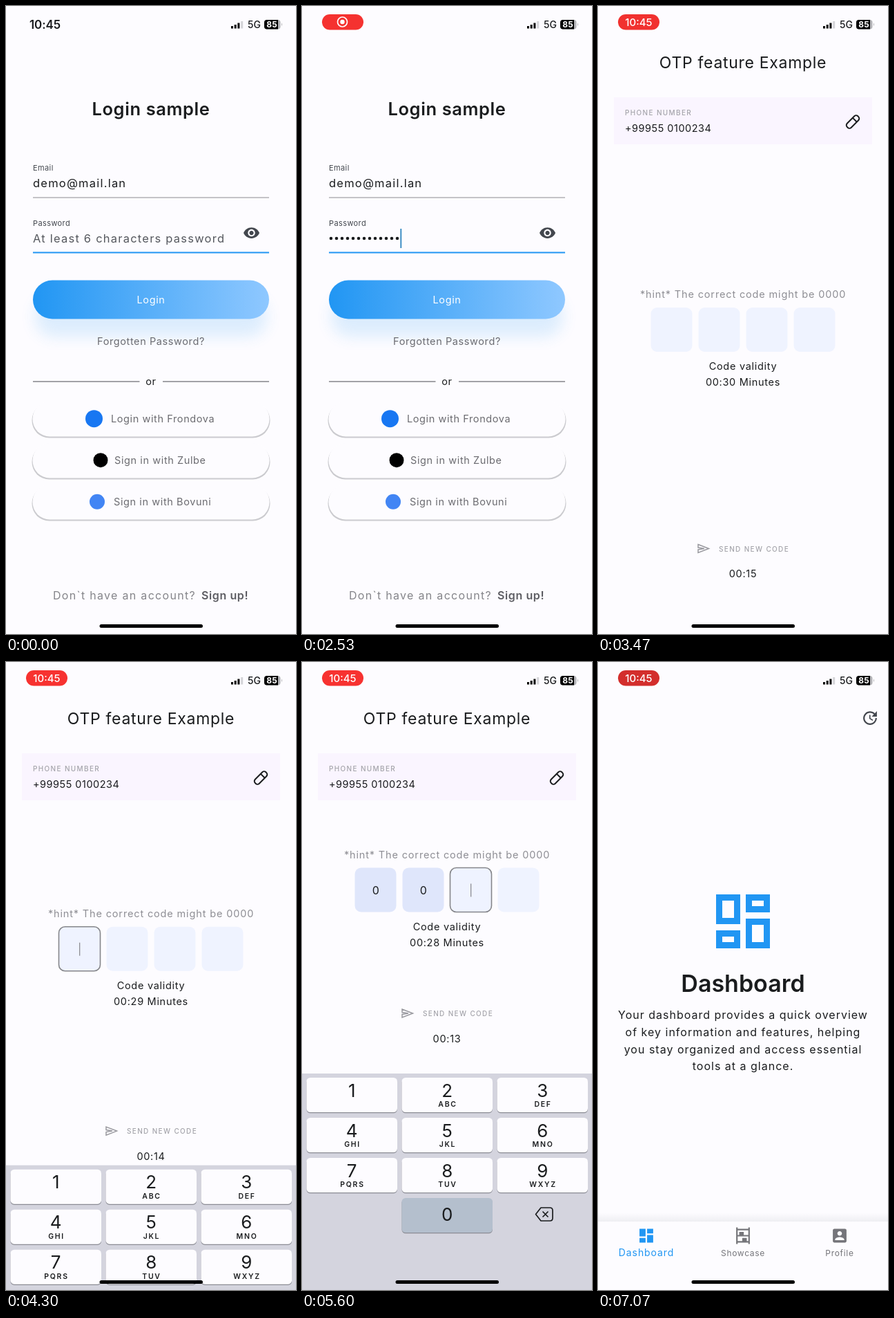
These frames come from a looping animation (420x908 px, 7130 ms). An HTML page:

```html
<!DOCTYPE html>
<html lang="en">
<head>
<meta charset="utf-8">
<title>Login flow</title>
<style>
html, body { margin: 0; width: 100%; height: 100%; overflow: hidden; background: #fdfcff; }
svg { display: block; width: 100vw; height: 100vh; }
text { font-family: Inter, "Work Sans", sans-serif; font-size: 14.5px; fill: #1a1c1e; letter-spacing: .7px; white-space: pre; }
.mid { text-anchor: middle; }
.small { font-size: 11px; letter-spacing: .4px; fill: #43474e; }
.field { font-size: 16.5px; letter-spacing: 1.22px; }
.link { letter-spacing: .6px; fill: #6b6b70; }
.caps { font-size: 10px; font-weight: 500; letter-spacing: 1.35px; fill: #a4a4aa; }
.para { font-size: 16px; letter-spacing: 1px; }
.tab { font-size: 12px; fill: #75757a; }
.digit { font-size: 26px; letter-spacing: 0; }
.letters { font-size: 10.5px; font-weight: 600; letter-spacing: 1.7px; }
.white { fill: #fff; }
.bg { fill: #fdfcff; }
</style>
</head>
<body>
<svg viewBox="0 0 420 908">
<defs>
  <linearGradient id="blue">
    <stop offset="0" stop-color="#2196f3"/>
    <stop offset="1" stop-color="#8fc8ff"/>
  </linearGradient>
  <linearGradient id="navShade" x2="0" y2="1">
    <stop offset="0" stop-color="#f0f0f4" stop-opacity="0"/>
    <stop offset="1" stop-color="#eeeef2"/>
  </linearGradient>
  <filter id="soft" x="-20%" y="-80%" width="140%" height="260%"><feGaussianBlur stdDeviation="11"/></filter>
</defs>

<g id="login">
  <rect class="bg" width="420" height="908"/>
  <text class="mid" x="210" y="158" style="font-size:25.5px;font-weight:600;letter-spacing:.6px">Login sample</text>
  <text class="small" x="39" y="237.5">Email</text>
  <text class="field" x="39" y="262">demo@mail.lan</text>
  <path d="M39 277H381" stroke="#8b8c90" stroke-width="1.2"/>
  <text class="small" x="39" y="317.5">Password</text>
  <text class="field" id="hint" x="39" y="342" style="fill:#55585e">At least 6 characters password</text>
  <path id="dots" stroke="#1a1c1e" stroke-width="4.6" stroke-linecap="round" stroke-dasharray="0 8"/>
  <rect id="caret" y="322" width="2" height="28" fill="#3f8fc5"/>
  <path d="M39 356.5H381" stroke="#2196f3" stroke-width="2"/>
  <path transform="translate(343 315.5) scale(1.045)" fill="#43474e" d="M12 4.5C7 4.5 2.73 7.61 1 12c1.73 4.39 6 7.5 11 7.5s9.27-3.11 11-7.5c-1.73-4.39-6-7.5-11-7.5zM12 17c-2.76 0-5-2.24-5-5s2.24-5 5-5 5 2.24 5 5-2.24 5-5 5zm0-8c-1.66 0-3 1.34-3 3s1.34 3 3 3 3-1.34 3-3-1.34-3-3-3z"/>
  <rect x="42" y="420" width="336" height="58" rx="28" fill="#2196f3" opacity=".15" filter="url(#soft)"/>
  <rect x="39" y="396.5" width="342" height="56" rx="28" fill="url(#blue)"/>
  <text class="mid link white" x="210" y="430">Login</text>
  <text class="mid link" x="210" y="490">Forgotten Password?</text>
  <path d="M39 543H193.500M227 543H381" stroke="#85858a" stroke-width="1.5"/>
  <text class="mid" x="210" y="548">or</text>
  <g id="social"></g>
  <text x="68" y="858" style="font-size:16px;letter-spacing:1.3px;fill:#85858a">Don`t have an account?</text>
  <text x="283" y="858" style="font-size:16px;letter-spacing:.6px;font-weight:600;fill:#5c5c62">Sign up!</text>
</g>

<g id="otp">
  <rect class="bg" width="420" height="908"/>
  <text class="mid" x="210" y="90" style="font-size:23px">OTP feature Example</text>
  <rect x="23" y="132" width="374" height="68" fill="#faf5ff"/>
  <text class="caps" x="39" y="158">PHONE NUMBER</text>
  <text x="39" y="182" style="letter-spacing:.5px">+99955 0100234</text>
  <g transform="translate(369 167.5) rotate(-45)" fill="none" stroke="#1a1c1e" stroke-width="2">
    <rect x="-11" y="-4.2" width="22" height="8.4" rx="3.6"/><path d="M4 -4V4"/>
  </g>
  <g id="code">
    <text class="mid" x="210" y="422" style="letter-spacing:.85px;fill:#8e8e94">*hint* The correct code might be 0000</text>
    <g id="cells"></g>
    <rect id="codeCaret" y="459" width="1.3" height="19" fill="#8e8e94"/>
    <text class="mid" x="210" y="526">Code validity</text>
    <text class="mid" x="210" y="549" id="validity"></text>
  </g>
  <g id="resend">
    <path d="M145 778.5L160.5 784.5L145 790.5V786L154 784.5L145 783Z" fill="none" stroke="#98989e" stroke-width="1.5"/>
    <text class="caps" x="175" y="788.5">SEND NEW CODE</text>
    <text class="mid" x="210" y="826" id="wait"></text>
  </g>
</g>

<g id="dash">
  <rect class="bg" width="420" height="908"/>
  <path transform="translate(380.8 67.8) scale(1.1)" fill="#43474e" d="M21 10.12h-6.78l2.74-2.82c-2.73-2.7-7.15-2.8-9.88-.1-2.73 2.71-2.73 7.08 0 9.79s7.15 2.71 9.88 0C18.32 15.65 19 14.08 19 12.1h2c0 1.98-.88 4.55-2.64 6.29-3.51 3.48-9.21 3.48-12.72 0-3.5-3.47-3.53-9.11-.02-12.58s9.14-3.47 12.65 0L21 3v7.12zM12.5 8v4.25l3.5 2.08-.72 1.21L11 13V8h1.5z"/>
  <path fill="none" stroke="#2196f3" stroke-width="9" d="M175.5 340.5h26v34h-26zM218.5 340.5h26v17h-26zM175.5 392.5h26v17h-26zM218.5 375.5h26v34h-26z"/>
  <text class="mid" x="210" y="477" style="font-size:34px;font-weight:600;letter-spacing:0">Dashboard</text>
  <text class="mid para" x="210" y="516">Your dashboard provides a quick overview</text>
  <text class="mid para" x="210" y="541">of key information and features, helping</text>
  <text class="mid para" x="210" y="566">you stay organized and access essential</text>
  <text class="mid para" x="210" y="590">tools at a glance.</text>
  <rect y="796" width="420" height="13" fill="url(#navShade)"/>
  <g fill="#75757a">
    <path transform="translate(56.8 816.3) scale(1.1)" fill="#2196f3" d="M3 13h8V3H3v10zm0 8h8v-6H3v6zm10 0h8V11h-8v10zm0-18v6h8V3h-8z"/>
    <path transform="translate(196.8 816.3) scale(1.1)" d="M19 23v-2H5v2H3V1h2v2h14V1h2v22zM5 11h2V7h6v4h6V5H5zm0 8h6v-4h6v4h2v-6H5z"/>
    <path transform="translate(336.8 816.3) scale(1.1)" d="M3 5v14c0 1.1.89 2 2 2h14c1.1 0 2-.9 2-2V5c0-1.1-.9-2-2-2H5c-1.11 0-2 .9-2 2zm12 4c0 1.66-1.34 3-3 3s-3-1.34-3-3 1.34-3 3-3 3 1.34 3 3zm-9 8c0-2 4-3.1 6-3.1s6 1.1 6 3.1v1H6v-1z"/>
  </g>
  <text class="mid" x="70" y="858.5" style="font-size:14px;letter-spacing:.9px;fill:#2196f3">Dashboard</text>
  <text class="mid tab" x="210" y="859">Showcase</text>
  <text class="mid tab" x="350" y="859">Profile</text>
</g>

<g id="keyboard">
  <rect y="595" width="420" height="320" fill="#d4d4de"/>
  <g id="keys"></g>
  <path d="M346 789h13q4 0 4 4v11q0 4-4 4h-13l-7.5-9.5zM348.5 794.5l8 8m0-8l-8 8" fill="none" stroke="#1a1c1e" stroke-width="1.7" stroke-linejoin="round"/>
</g>

<text id="clock" x="34" y="33" style="font-size:17px;font-weight:600;letter-spacing:-.1px">10:45</text>
<g id="pill">
  <rect id="pillBox" x="29" y="12" width="60" height="22.5" rx="11.25"/>
  <g id="rec">
    <circle cx="58.5" cy="23" r="7" fill="none" stroke="#fff" stroke-width="1.7"/>
    <circle cx="58.5" cy="23" r="3.2" fill="#fff"/>
  </g>
  <text id="pillTime" class="mid white" x="59" y="28.5" style="font-size:15px;font-weight:500;letter-spacing:0">10:45</text>
</g>
<path d="M326 29h3v3.500h-3zM330.700 27h3v5.500h-3zM335.400 24.500h3v8h-3z"/>
<path d="M340.200 22h3v10.500h-3z" fill="#d4d4d8"/>
<text x="350" y="32" style="font-size:14px;font-weight:500;letter-spacing:0">5G</text>
<rect x="374" y="20" width="23.5" height="13.5" rx="4" fill="#b4b4b8"/>
<path d="M378 20h16v13.500h-16q-4 0-4-4v-5.500q0-4 4-4z"/>
<path d="M399 24.500q2 2.200 0 4.500z" fill="#b4b4b8"/>
<text class="mid white" x="385" y="31.3" style="font-size:12px;font-weight:700;letter-spacing:0">85</text>
<rect x="135.5" y="894" width="149.5" height="5" rx="2.5"/>
</svg>

<script>
const $ = id => document.getElementById(id);
const LOOP = 7130;
const clamp = v => Math.min(1, Math.max(0, v));
const show = (el, on) => el.style.display = on ? '' : 'none';
const move = (el, x, y) => el.setAttribute('transform', `translate(${x} ${y})`);
const slide = p => 1 - (1 - clamp(p)) ** 5;
const spring = ms => { const u = Math.max(0, ms) * .01826; return 1 - (1 + u) * Math.exp(-u); };
const blink = ms => clamp(.5 + 2.5 * Math.cos(ms * Math.PI / 500));

$('social').innerHTML = [
  ['Login with Frondova', '#1877f2', 127.5, 12.5, 152],
  ['Sign in with Zulbe', '#000', 137, 10.5, 157],
  ['Sign in with Bovuni', '#4285f4', 132, 11, 156]
].map(([label, color, cx, r, x], i) => `<g transform="translate(0 ${i * 60})">
  <rect x="37.5" y="574" width="345" height="50.5" rx="25" fill="#cbcbcf"/>
  <rect class="bg" x="38.5" y="572" width="343" height="50.5" rx="25"/>
  <circle cx="${cx}" cy="596.7" r="${r}" fill="${color}"/>
  <text class="link" x="${x}" y="602">${label}</text></g>`).join('');

$('cells').innerHTML = [0, 1, 2, 3].map(i => `<rect x="${76.5 + i * 69}" y="436" width="60" height="64" rx="9" stroke-width="1.6"/>
  <text class="mid" x="${106.7 + i * 69}" y="474.5" style="font-size:16px;letter-spacing:0">0</text>`).join('');
const boxes = $('cells').querySelectorAll('rect');
const zeros = $('cells').querySelectorAll('text');

const letters = ['', 'ABC', 'DEF', 'GHI', 'JKL', 'MNO', 'PQRS', 'TUV', 'WXYZ'];
$('keys').innerHTML = [1, 2, 3, 4, 5, 6, 7, 8, 9, 0].map((n, i) => {
  const x = 6.5 + (n ? i % 3 : 1) * 138, y = 601 + Math.floor(i / 3) * 58;
  return `<rect x="${x}" y="${y + 1.3}" width="131.5" height="50" rx="5.5" fill="#8b8c94"/>
    <rect id="key${n}" class="bg" x="${x}" y="${y}" width="131.5" height="50" rx="5.5"/>
    <text class="mid digit" x="${x + 65.7}" y="${y + (n ? 27.5 : 33)}">${n}</text>
    <text class="mid letters" x="${x + 66.5}" y="${y + 42.3}">${n ? letters[i] : ''}</text>`;
}).join('');

const TYPE = 1080, OTP = 2720, KEYS = 4195, CLOSE = 6180, DASH = 6230;
const TAPS = [5150, 5520, 5830, 6090];

function pushPage(from, to, p) {
  move($(from), -140 * p, 0);
  move($(to), 420 * (1 - p), 0);
  show($(from), p < .999);
  show($(to), p > 0);
}

function statusPill(t) {
  const grow = clamp((t - 100) / 200);
  show($('clock'), !grow);
  $('pill').style.opacity = grow;
  const dark = Math.max(0, Math.cos((t - 1000) / 2023 * 2 * Math.PI));
  $('pillBox').setAttribute('fill', `rgb(${247 - 36 * dark},${50 - 4 * dark},${48 - 4 * dark})`);
  const swap = clamp((t - 2950) / 200);
  $('rec').style.opacity = 1 - swap;
  $('pillTime').style.opacity = swap;
}

function password(t) {
  const n = t < TYPE ? 0 : Math.min(13, 1 + Math.floor((t - TYPE) / 108));
  show($('hint'), !n);
  show($('dots'), n);
  $('dots').setAttribute('d', `M42 336h${Math.max(0, n - 1) * 8 + .1}`);
  $('caret').setAttribute('x', n ? 38 + 8 * n + .3 : 39);
  $('caret').style.opacity = n ? (t < 2600 ? 1 : blink(t - 2500)) : blink(t - 500);
}

function codeEntry(t) {
  const lift = delay => spring(t - KEYS - delay) - spring(t - CLOSE - delay);
  move($('keyboard'), 0, 313 * (1 - lift(0)));
  show($('keyboard'), lift(0) > .001);
  move($('code'), 0, -138.5 * lift(33));
  move($('resend'), 0, -276.5 * lift(33));

  const count = TAPS.filter(tap => t >= tap).length;
  const focused = t >= KEYS && t < CLOSE;
  boxes.forEach((box, i) => {
    const active = focused && i === count;
    box.setAttribute('fill', i < count ? '#dfe6fb' : '#eff3ff');
    box.setAttribute('stroke', active ? '#85868a' : 'none');
    show(zeros[i], i < count);
  });
  show($('codeCaret'), focused && count < 4);
  $('codeCaret').setAttribute('x', 106 + 69 * count);
  $('codeCaret').style.opacity = blink(t - (TAPS[count - 1] || 4450));
  $('key0').style.fill = TAPS.some(tap => t >= tap && t < tap + 130) ? '#b4bfcd' : '';

  const spent = Math.max(0, Math.floor((t - 2750) / 1000));
  $('validity').textContent = `00:${30 - spent} Minutes`;
  $('wait').textContent = `00:${15 - spent}`;
}

const start = performance.now();
function draw(now) {
  const t = Math.max(0, now - start) % LOOP;
  statusPill(t);
  password(t);
  codeEntry(t);
  if (t < DASH) {
    pushPage('login', 'otp', slide((t - OTP) / 500));
    show($('dash'), false);
  } else {
    show($('login'), false);
    pushPage('otp', 'dash', slide((t - DASH) / 500));
  }
  requestAnimationFrame(draw);
}
draw(start);
</script>
</body>
</html>
```
